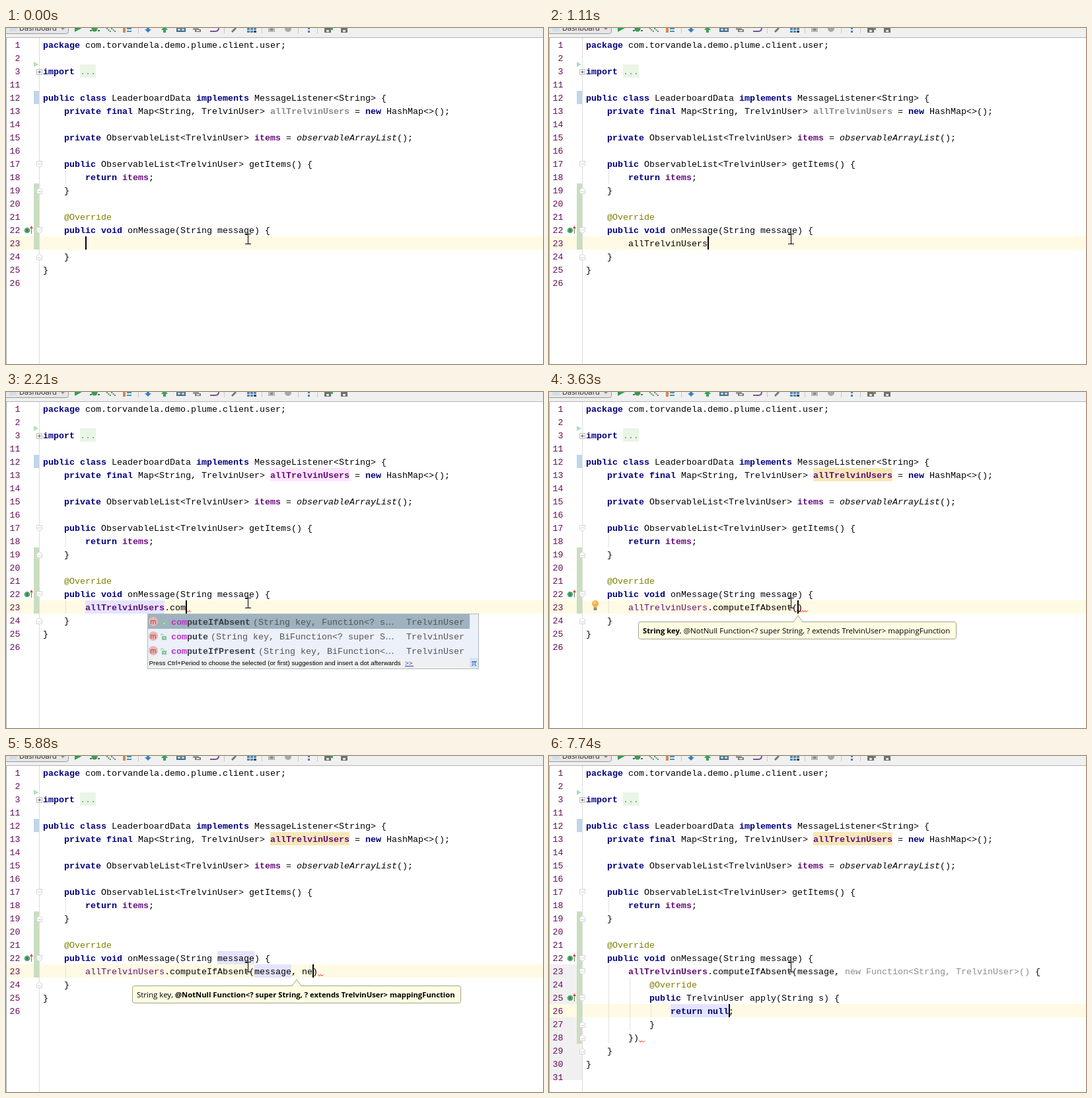
Write an HTML page with a canvas that moves like this. It is 813x508 px and loops after 8 s.

```html
<!DOCTYPE html>
<html lang="en">
<head>
<meta charset="utf-8">
<title>Code completion</title>
<style>
html, body { margin: 0; width: 100%; height: 100%; overflow: hidden; background: #fff; }
canvas { display: block; width: 813px; height: 508px; }
</style>
</head>
<body>
<canvas id="stage" width="813" height="508"></canvas>
<script>
const g = document.getElementById('stage').getContext('2d');
const LOOP = 8000, CW = 8, LEFT = 56;
const MONO = '13.333px "Liberation Mono", monospace';
const UI = '"Open Sans", sans-serif';
const SMALL = '9.75px "Liberation Sans", sans-serif';
const colX = c => LEFT + c * CW;
const rowTop = r => 15 + r * 20;

// ---------- document ----------
const HEAD = [
  'package com.torvandela.demo.plume.client.user;', '', 'import', '',
  'public class LeaderboardData implements MessageListener<String> {',
  '    private final Map<String, TrelvinUser> allTrelvinUsers = new HashMap<>();', '',
  '    private ObservableList<TrelvinUser> items = observableArrayList();', '',
  '    public ObservableList<TrelvinUser> getItems() {',
  '        return items;', '    }', '',
  '    @Override',
  '    public void onMessage(String message) {'
];
const BODY = [
  '            @Override',
  '            public TrelvinUser apply(String s) {',
  '                return null;',
  '            }', '        })'
];
const TAIL = ['    }', '}', ''];
const FIELD = 'allTrelvinUsers';
const CALL = FIELD + '.computeIfAbsent(';

// ---------- completion lists: name, tail, type, icon ----------
const user = 'TrelvinUser';
const LOCALS = [
  [FIELD, '', 'Map<String, ' + user + '>', 'f'],
  ['allTasks', '()', 'int', 'm'], ['allTypes', '()', 'int', 'm'],
  ['allocate', '(int size)', 'void', 'm'], ['assert', '', '', ''],
  ['ArrayList', '<E> (java.util)', '', 'C'], ['Arrays', ' (java.util)', '', 'C'],
  ['AbstractMap', '<K, V> (java.util)', '', 'C'], ['AbstractSet', '<E> (java.util)', '', 'C']
];
const METHODS = [
  ['computeIfAbsent', '(String key, Function<? super String, ?>', user, 'm'],
  ['compute', '(String key, BiFunction<? super String, ?>', user, 'm'],
  ['computeIfPresent', '(String key, BiFunction<? super String, ?>', user, 'm'],
  ['containsKey', '(Object key)', 'boolean', 'm'],
  ['containsValue', '(Object value)', 'boolean', 'm'],
  ['clear', '()', 'void', 'm'], ['get', '(Object key)', user, 'm'],
  ['put', '(String key, ' + user + ' value)', user, 'm'], ['size', '()', 'int', 'm']
];
const PARAMS = [['message', '', 'String', 'p'], ['messageCount', '()', 'int', 'm']];
const WORDS = [['new', '', '', '']];
const TYPES = [
  ['Function', '<T, R> (java.util.function)', '', 'I'],
  ['FunctionalInterface', ' (java.lang)', '', 'I'], ['Future', '<V> (java.util.concurrent)', '', 'I'],
  ['Formatter', ' (java.util)', '', 'C'], ['File', ' (java.io)', '', 'C'], ['Float', ' (java.lang)', '', 'C']
];
const pop = (list, prefix, x) => ({
  x, n: prefix.length,
  rows: list.filter(r => r[0].toLowerCase().startsWith(prefix.toLowerCase()))
});
const tip = (x, arrow, second) => ({ x, arrow, second });

// ---------- timeline: each entry changes part of the state ----------
const base = { text: '', field: 'plain', mark: '', use: 0, guide: 0, close: 0, waves: [],
  bulb: 0, tip: null, pop: null, msg: 0, match: 0, open: 0, glow: 0, caret: 1 };
const STEPS = [[0, {}]];
const at = (t, change) => STEPS.push([t, change]);

['a', 'al', 'all', 'allT'].forEach((s, i) =>
  at([260, 390, 540, 670][i], { text: s, pop: pop(LOCALS, s, 86) }));
at(1110, { text: FIELD, pop: null });
at(1390, { field: 'field', mark: '#ffe4ff', use: 1, guide: 1 });
['', 'c', 'co', 'com'].forEach((s, i) =>
  at([1820, 1960, 2090, 2210][i], { text: FIELD + '.' + s, pop: pop(METHODS, s, 214),
    waves: i === 3 ? [[273, 280]] : [] }));
at(2520, { text: FIELD + '.comp', pop: pop(METHODS, 'comp', 214) });
at(2650, { text: CALL, close: 1, pop: null, waves: [] });
at(2950, { field: 'thin', mark: '#f5e8b9', use: 0, waves: [[371, 392]] });
at(3350, { bulb: 1 });
at(3630, { tip: tip(135, 377, 0) });
['m', 'me', 'mes'].forEach((s, i) =>
  at(3760 + i * 130, { text: CALL + s, bulb: 0, pop: pop(PARAMS, s, 311) }));
at(4320, { text: CALL + 'message', pop: null, tip: tip(191, 432, 0), waves: [[371, 432], [440, 448]] });
at(4580, { msg: 1 });
at(5040, { bulb: 1 });
at(5200, { text: CALL + 'message,', bulb: 0, waves: [[448, 456]] });
at(5340, { tip: tip(191, 440, 1) });
at(5480, { text: CALL + 'message, ', waves: [[456, 464]] });
at(5720, { text: CALL + 'message, n', waves: [[464, 472]] });
at(5880, { text: CALL + 'message, ne', waves: [[472, 480]] });
at(6160, { text: CALL + 'message, new', msg: 0, pop: pop(WORDS, 'new', 311), waves: [[480, 488]] });
at(6310, { text: CALL + 'message, new ', pop: null, tip: tip(223, 472, 1), waves: [[472, 480], [488, 496]] });
at(6720, { bulb: 1, match: 1 });
['F', 'Fu', 'Fun'].forEach((s, i) =>
  at(6850 + i * 150, { text: CALL + 'message, new ' + s, bulb: 0, match: 0, waves: [],
    pop: pop(TYPES, s, 311) }));
at(7310, { text: CALL + 'message, new Function<String, ' + user + '>() {', field: 'field',
  close: 0, pop: null, tip: null, open: 1 });
at(7610, { glow: 1, caret: 0 });
at(7740, { caret: 1 });

const STATES = [];
let last = base;
for (const [t, change] of STEPS) STATES.push([t, last = { ...last, ...change }]);

// ---------- drawing helpers ----------
function rect(x, y, w, h, fill) { g.fillStyle = fill; g.fillRect(x, y, w, h); }
function write(s, x, y, font, fill, align = 'left') {
  g.font = font; g.fillStyle = fill; g.textAlign = align;
  g.fillText(s, x, y);
}
function shape(points, fill, stroke) {
  g.beginPath();
  points.forEach(([x, y]) => g.lineTo(x, y));
  g.closePath();
  if (fill) { g.fillStyle = fill; g.fill(); }
  if (stroke) { g.strokeStyle = stroke; g.lineWidth = 1; g.stroke(); }
}
function disc(x, y, r, fill) {
  g.beginPath(); g.arc(x, y, r, 0, 7); g.fillStyle = fill; g.fill();
}
function wave(x0, x1, y) {
  g.beginPath();
  for (let x = x0, i = 0; x <= x1; x += 2, i++) g.lineTo(x + .5, y + (i % 2 ? 1.5 : -.5));
  g.strokeStyle = '#ff0000'; g.lineWidth = 1; g.stroke();
}

const STYLE = {
  plain: ['', '#000'], word: ['bold ', '#000080'], note: ['', '#808000'], call: ['italic ', '#000'],
  ghost: ['', '#8c8c8c'], field: ['bold ', '#660e7a'], thin: ['', '#660e7a'], unused: ['bold ', '#8c8c8c']
};
const TOKEN = new RegExp('(?<ghost>new Function<.*?>\\(\\))|(?<note>@Override)|(?<call>observableArrayList)|' +
  '(?<field>\\bitems\\b|' + FIELD + ')|' +
  '(?<word>\\b(?:package|import|public|class|implements|private|final|new|return|void|null)\\b)', 'g');

function code(row, line, field = 'field') {
  const y = rowTop(row) + 15;
  const run = (s, col, style) => {
    const [weight, fill] = STYLE[style];
    if (s.trim()) write(s, colX(col), y, weight + MONO, fill);
  };
  let pos = 0;
  for (const m of line.matchAll(TOKEN)) {
    run(line.slice(pos, m.index), pos, 'plain');
    const kind = Object.keys(m.groups).find(k => m.groups[k]);
    run(m[0], m.index, kind === 'field' ? field : kind);
    pos = m.index + m[0].length;
  }
  run(line.slice(pos), pos, 'plain');
}

function fold(row, end) {
  const y = rowTop(row) + 11, d = end ? -1 : 1;
  shape([[46.5, y - 4.5 * d], [54.5, y - 4.5 * d], [54.5, y + 1.5 * d], [50.5, y + 4.5 * d], [46.5, y + 1.5 * d]],
    '#fff', '#d2d2d2');
  rect(48, y - d, 5, 1, '#d2d2d2');
}
function override(row) {
  const y = rowTop(row) + 11;
  disc(32, y, 4.3, '#4fa768');
  rect(31.5, y - 2, 1, 4, '#124d26');
  rect(38, y - 4, 1, 9, '#777');
  shape([[36, y - 3], [38.5, y - 7], [41, y - 3]], '#d64545');
}

function toolbar() {
  rect(0, 0, 813, 14, '#f0f0f0');
  rect(0, 14, 813, 1, '#b4b4b4');
  g.beginPath(); g.roundRect(-5.5, -10.5, 100, 19, 3);
  g.fillStyle = '#e6e6e6'; g.fill();
  g.strokeStyle = '#9a9a9a'; g.lineWidth = 1; g.stroke();
  rect(5, 0, 11, 5, '#cfdfea');
  write('Dashboard', 20, 4, '11px ' + UI, '#222');
  shape([[83, 0], [89, 0], [86, 3]], '#888');

  shape([[104, -6], [115, 0], [104, 6]], '#2fa04b');
  disc(134, 1, 4.5, '#3c9a50');
  for (const x of [127, 139]) rect(x, 3, 3, 2, '#3c7f49');
  for (let i = 0; i < 6; i++) rect(152 + i * 2.4, i % 3 * 2, 2, 2, i % 2 ? '#777' : '#46a45a');
  rect(177, 0, 4, 7, '#d98843'); rect(183, 0, 7, 2, '#4a90be'); rect(183, 4, 7, 2, '#4a90be');
  rect(213, 0, 4, 3, '#3b7ec2'); shape([[210, 2], [220, 2], [215, 7]], '#3b7ec2');
  shape([[235, 3], [240, -3], [245, 3]], '#37a352'); rect(238, 2, 4, 5, '#37a352');
  rect(258, 0, 14, 6, '#4a6e87'); rect(260, 1, 4, 3, '#b6d2e5'); rect(266, 1, 4, 3, '#b6d2e5');
  rect(283, 0, 9, 3, '#999'); rect(286, 2, 9, 4, '#777'); rect(288, 3, 5, 2, '#ddd');
  rect(309, 4, 9, 2, '#76549c');
  g.beginPath(); g.arc(317, 0, 5, -1.5, 1.5); g.strokeStyle = '#76549c'; g.lineWidth = 2; g.stroke();
  shape([[341, 5], [347, -1], [349, 1], [343, 7]], '#777');
  for (let i = 0; i < 6; i++) rect(365 + i % 3 * 5, i < 3 ? 0 : 4, 4, 3, i === 5 ? '#444' : '#4a87b8');
  rect(397, 0, 10, 6, '#b8b8b8'); rect(400, 1, 4, 3, '#888');
  disc(427, 1, 5, '#a8a8a8');
  rect(457, 0, 3, 2, '#3c7fb8'); rect(457, 4, 3, 3, '#3c7fb8');
  for (const x of [482, 507]) { rect(x, 0, 10, 7, '#707070'); rect(x + 3, 3, 4, 3, '#e4e4e4'); }
  rect(491, 0, 4, 3, '#44a558');
  for (const x of [200, 330, 387, 442, 471]) rect(x, 0, 1, 8, '#c8c8c8');
}

function tooltip({ x, arrow, second }) {
  const w = second ? 497 : 481, fill = '#fefce2', edge = '#a3a28f';
  g.beginPath(); g.roundRect(x + .5, 347.5, w, 26, 3);
  g.fillStyle = fill; g.fill();
  g.strokeStyle = edge; g.lineWidth = 1; g.stroke();
  shape([[arrow - 7, 348.5], [arrow, 338], [arrow + 7, 348.5]], fill);
  g.beginPath(); g.moveTo(arrow - 7, 347.5); g.lineTo(arrow, 338); g.lineTo(arrow + 7, 347.5); g.stroke();
  const bold = 'bold 11.25px ' + UI, normal = '11.5px ' + UI;
  const parts = [['String key', !second], [', ', 0],
    ['@NotNull Function<? super String, ? extends ' + user + '> mappingFunction', second]];
  let tx = x + 7;
  for (const [s, strong] of parts) {
    write(s, tx, 365, strong ? bold : normal, '#000');
    tx += g.measureText(s).width;
  }
}

const ICON = { m: '#efb3ae', f: '#f2cf8f', p: '#c9b8e4', C: '#a9cde8', I: '#b4dba9' };
function popup({ x, n, rows }) {
  const h = rows.length * 22, foot = 336 + h;
  rect(x, 335, 502, h + 18, '#b4babe');
  rect(x + 1, 336, 500, h, '#ebf0f9');
  rows.forEach(([name, tail, type, icon], i) => {
    const top = 336 + i * 22, y = top + 16, nx = x + 36;
    if (!i) rect(x + 1, top, 487, 22, '#9eb2bf');
    if (icon) {
      disc(x + 9, top + 11, 7, ICON[icon]);
      write(icon, x + 9, top + 14.5, '10px ' + UI, '#6b4444', 'center');
    }
    if (icon === 'm') {
      rect(x + 22, top + 11, 7, 6, '#8cc49a');
      g.beginPath(); g.arc(x + 22.5, top + 10, 2.2, 3.1, 6.3);
      g.strokeStyle = '#8cc49a'; g.lineWidth = 1; g.stroke();
      rect(x + 25, top + 13, 1, 2, '#fff');
    }
    write(name.slice(0, n), nx, y, 'bold ' + MONO, '#b535c0');
    write(name.slice(n), nx + n * CW, y, 'bold ' + MONO, '#3c4146');
    const tx = nx + name.length * CW + 4, end = x + 448 - type.length * CW;
    const room = Math.floor((end - tx) / CW);
    write(tail.slice(0, room), tx, y, MONO, '#555');
    if (tail.length > room) write('…', end, y, '14px "Liberation Sans", sans-serif', '#555');
    write(type, x + 480, y, MONO, '#555', 'right');
  });
  rect(x + 1, foot, 500, 16, '#f0f0f0');
  write('Press Ctrl+Period to choose the selected (or first) suggestion and insert a dot afterwards',
    x + 2.5, foot + 11, SMALL, '#000');
  write('>>', x + 390, foot + 11, SMALL, '#2445c8');
  rect(x + 390, foot + 12, 13, 1, '#2445c8');
  rect(x + 488, foot, 13, 15, '#d4e4f1');
  write('π', x + 494.5, foot + 12, 'bold 13px "Noto Serif", serif', '#3f79ad', 'center');
}

function pointer() {
  rect(366, 312, 1, 15, '#000');
  for (const y of [311, 326]) { rect(362, y, 4, 1, '#000'); rect(367, y, 4, 1, '#000'); }
}
function bulb() {
  disc(70, 320, 5, '#f4b04f');
  disc(69, 318.5, 2, '#fbd596');
  rect(67.5, 324, 5, 2, '#f4b04f');
  rect(67.5, 326, 5, 4, '#8b8b8b');
}

// ---------- scene ----------
function draw(s) {
  const grow = s.open ? BODY.length : 0, caretRow = s.open ? 18 : 15;
  rect(0, 0, 813, 508, '#fff');
  if (s.open) rect(1, 315, 49, 175, '#f0f0f0');
  rect(1, rowTop(caretRow), 812, 20, '#fffae3');
  rect(50, 15, 1, 493, '#dcdcdc');
  rect(42, 95, 8, 20, '#c0d6e8');
  rect(42, 235, 8, 100 + grow * 20, '#c9dec1');
  rect(0, 15, 1, 493, '#a8a8a8');

  // gutter
  for (let r = 0; r < 19 + grow; r++)
    write(r < 3 ? r + 1 : r + 8, 21.5, rowTop(r) + 15, MONO, '#660e58', 'right');
  shape([[42, 51], [49, 55], [42, 59]], '#b5dcb8');
  shape([[46.5, 62.5], [54.5, 62.5], [54.5, 70.5], [46.5, 70.5]], '#fff', '#b8b8b8');
  rect(48, 66, 5, 1, '#666'); rect(50, 64, 1, 5, '#666');
  fold(9); fold(11, 1); fold(14);
  override(14);
  if (s.open) {
    fold(15); fold(17); fold(19, 1); fold(20, 1);
    override(17);
  }
  fold(16 + grow, 1);

  // guides and marks
  const guide = (x, r, n) => rect(x, rowTop(r), 1, n * 20, '#e2e2e2');
  guide(90, 10, 1);
  if (s.guide) guide(90, 15, 1 + grow);
  if (s.open) { guide(122, 16, 4); guide(154, 18, 1); }
  rect(112, 55, 24, 20, '#e9f5e6');
  write('...', 112, 70, MONO, '#6f9070');
  if (s.mark) rect(400, 115, 120, 20, s.mark);
  if (s.use) rect(120, 315, 120, 20, '#e4e4ff');
  if (s.msg) { rect(320, 295, 56, 20, '#e4e4ff'); rect(376, 315, 56, 20, '#e4e4ff'); }
  if (s.glow) rect(184, 375, 88, 20, '#e4e4ff');
  if (s.match) { rect(368, 315, 8, 20, '#99ccff'); rect(480, 315, 8, 20, '#99ccff'); }

  // text
  HEAD.forEach((line, r) => code(r, line, r === 5 && !s.mark ? 'unused' : 'field'));
  code(15, '        ' + s.text + (s.close ? ')' : ''), s.field);
  (s.open ? BODY.concat(TAIL) : TAIL).forEach((line, i) => code(16 + i, line));
  s.waves.forEach(([a, b]) => wave(a, b, 331));
  if (s.open) wave(136, 144, 431);
  if (s.caret) rect(s.open ? 272 : colX(8 + s.text.length), rowTop(caretRow), 2, 20, '#000');

  if (s.bulb) bulb();
  if (s.tip) tooltip(s.tip);
  if (s.pop) popup(s.pop);
  toolbar();
  pointer();
}

function tick() {
  const t = performance.now() % LOOP;
  let now = STATES[0][1];
  for (const [start, state] of STATES) if (t >= start) now = state;
  draw(now);
  requestAnimationFrame(tick);
}
tick();
</script>
</body>
</html>
```
